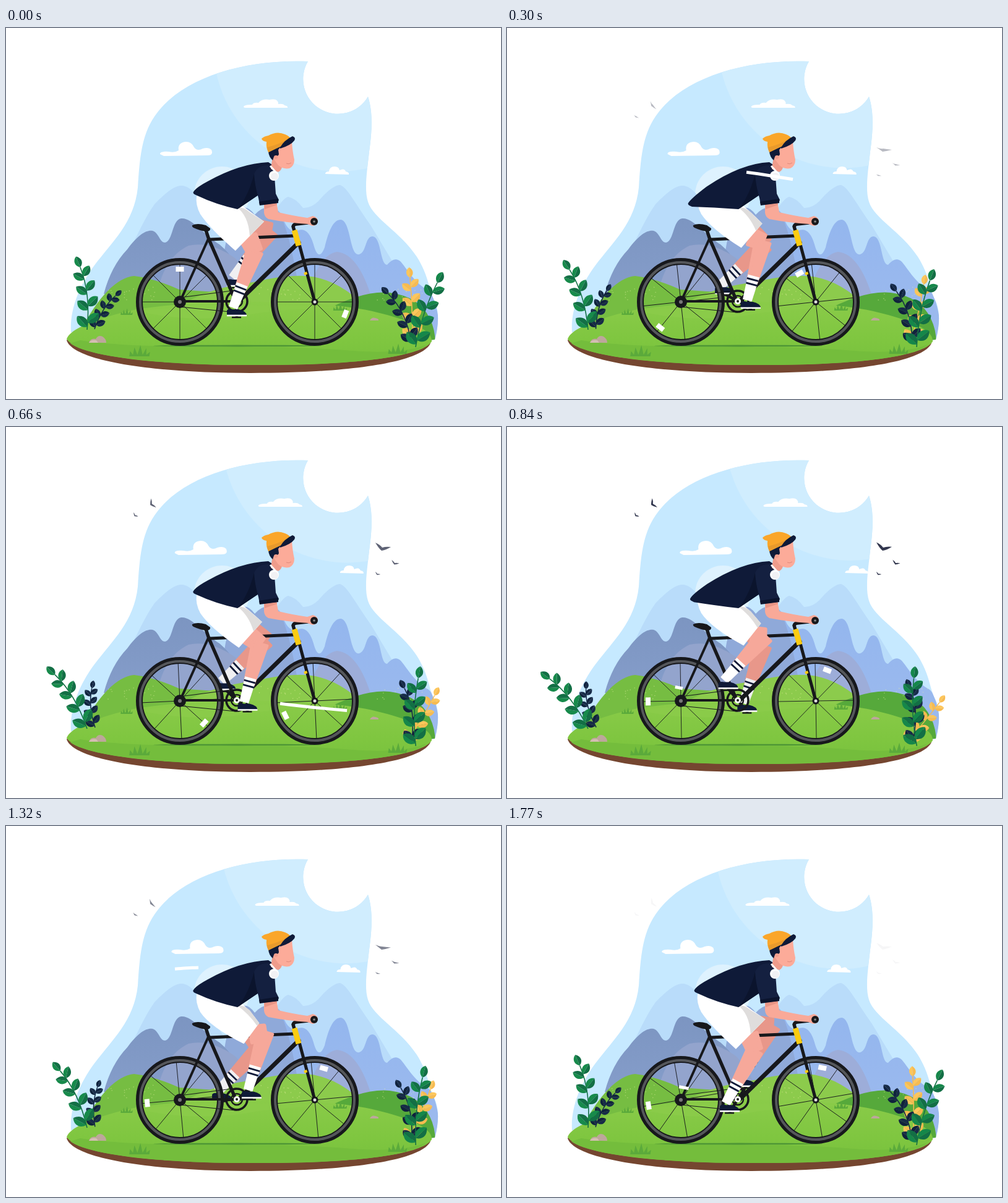
Recreate the animation shown at these times as an HTML page. Size 800 px wide and 600 px high, loop 1.8 s.

```html
<!DOCTYPE html>
<html lang="en">
<head>
<meta charset="utf-8">
<title>Cyclist</title>
<style>
html, body { margin: 0; width: 100%; height: 100%; overflow: hidden; background: #fff; }
svg { display: block; width: 800px; height: 600px; }
.line { fill: none; stroke: #17181c; }
</style>
</head>
<body>
<svg viewBox="0 0 800 600">
  <defs>
    <linearGradient id="rock" x1="0" y1="0" x2="0" y2="1">
      <stop offset="0" stop-color="#7c95c1"/><stop offset="1" stop-color="#859dca"/>
    </linearGradient>
    <linearGradient id="range" x1="0" y1="0" x2="0" y2="1">
      <stop offset="0" stop-color="#93b6ee"/><stop offset="1" stop-color="#9dbaee"/>
    </linearGradient>
    <linearGradient id="lawn" x1="0" y1="0" x2="0" y2="1">
      <stop offset="0" stop-color="#8acb49"/><stop offset=".6" stop-color="#7fc640"/><stop offset="1" stop-color="#78c13d"/>
    </linearGradient>
    <clipPath id="blob">
      <path d="M105 492C103 455 118 418 142 385C172 345 207 315 213 258C216 215 218 175 240 143C282 80 385 50 488 54A54 54 0 0 0 585 111C593 135 592 165 587 200C583 235 579 262 585 281C594 309 636 328 664 370C684 402 682 420 692 440C700 455 700 480 693 504L400 530Z"/>
    </clipPath>
  </defs>

  <g clip-path="url(#blob)">
    <rect x="90" y="40" width="620" height="500" fill="#c6e9ff"/>
    <circle id="glow" cx="538" cy="29" r="203" fill="#d0edfe"/>
    <circle cx="349" cy="269" r="45" fill="#def2fe"/>
    <g fill="#b9dcfa">
      <path d="M160 425C200 370 215 320 240 285Q270 253 285 255Q300 256 318 285L400 420Z"/>
      <path d="M385 420C410 350 435 280 456 273Q468 275 480 291Q492 292 505 280C520 262 532 254 540 254C552 258 565 285 590 320L650 420Z"/>
    </g>
    <path d="M380 430Q395 330 422 298Q436 286 446 303Q455 332 470 328Q488 320 497 350Q505 380 515 355C522 325 530 310 541 310C558 312 555 370 571 366C583 362 580 338 592 337C607 337 604 383 616 383C622 376 630 370 638 378C650 392 660 412 682 424Q696 432 705 510H380Z" fill="url(#range)"/>
    <path d="M345 440Q352 325 372 300Q386 280 402 302Q426 276 446 308Q462 345 476 440Z" fill="#8fa9d9"/>
    <path d="M484 440Q505 366 535 362Q570 365 592 440Z" fill="#9dadd9"/>
    <path d="M158 430Q170 385 196 358C214 333 228 326 237 328C248 332 248 347 257 347C270 345 268 310 283 308C300 306 318 333 345 350Q375 375 395 430Z" fill="url(#rock)"/>
    <path d="M244 430Q256 370 295 352Q330 344 370 372Q392 395 405 430Z" fill="#93a4cd"/>
    <path d="M120 490Q165 405 207 401Q240 405 280 423L380 430V490Z" fill="#76bd42"/>
    <path d="M250 480Q290 425 400 411Q450 399 485 401Q540 405 590 460V480Z" fill="#8ccb4c"/>
    <path d="M510 460Q575 424 620 428Q668 434 685 470Q694 488 694 512H510Z" fill="#56a93b"/>
    <g id="clouds" fill="#fff">
      <path d="M384 128Q384 124 398 124Q400 120 408 121Q414 114 426 116Q440 113 440 123Q448 122 450 125Q456 126 455 129L386 129Z"/>
      <path d="M249 204Q248 199 263 200Q273 202 279 198Q277 185 291 184Q300 184 304 193Q309 200 318 195Q327 192 332 197Q336 206 325 206L255 207Z"/>
      <path d="M516 236Q516 232 522 232Q523 224 531 224Q538 224 539 230Q547 226 549 232Q555 233 554 237Z"/>
    </g>
  </g>

  <path d="M98 505C108 538 235 558 395 558C560 558 672 540 686 510L670 490H110Z" fill="#754630"/>
  <path d="M98 503C103 489 130 476 185 461C270 438 510 436 600 460C650 472 690 488 688 507C670 535 540 546 392 545C240 545 116 531 98 503Z" fill="url(#lawn)"/>
  <path d="M120 505C230 523 420 509 560 522Q640 528 680 512C650 538 520 546 392 545C250 545 130 531 104 510Z" fill="#74bd3c"/>
  <path d="M213 458Q360 440 560 454Q470 450 390 464Q300 478 213 458Z" fill="#8acb49"/>
  <g fill="#eef3a4" opacity=".45" id="flowers"></g>
  <g fill="#5baa3b" id="tufts"></g>
  <path d="M134 509Q137 501 145 503Q149 496 156 499Q162 503 162 509Z" fill="#bda79b"/>
  <path d="M134 509Q138 503 146 505L149 509Z" fill="#d4beb2"/>
  <path d="M588 473Q591 467 597 469Q603 470 602 473Z" fill="#bda79b"/>
  <ellipse cx="374" cy="514" rx="136" ry="1.400" fill="#4e9636"/>

  <g id="birds" fill="#20263f"></g>
  <g id="farLeg"></g>

  <g id="wheels"></g>
  <g class="line" stroke-linecap="round">
    <path d="M281 443L327 341M281 442H372" stroke-width="4"/>
    <path d="M322 324L328 342L371 441" stroke-width="5.500"/>
    <path d="M329 342L467 336" stroke-width="5"/>
    <path d="M473 347L376 442" stroke-width="7"/>
    <path d="M474 350L499 443" stroke-width="5"/>
    <path d="M466 328L464 321Q465 317 470 317L496 314" stroke-width="5.500"/>
    <path d="M281 436L372 424M281 451L372 460" stroke-width="1.200"/>
  </g>
  <path d="M301 319Q309 315 323 319L330 324Q331 329 323 329Q314 328 303 323Q300 321 301 319Z" fill="#17181c"/>
  <path d="M466 327L473 352" stroke="#fbcc12" stroke-width="9"/>
  <path d="M483.500 395L485 399" stroke="#fbcc12" stroke-width="5"/>
  <circle cx="281" cy="443" r="10" fill="#17181c"/><circle cx="281" cy="443" r="3" fill="#777"/>
  <circle cx="499" cy="443" r="5.500" fill="#17181c"/><circle cx="499" cy="443" r="2.500" fill="#ddd"/>
  <g id="reflectors" fill="#fff">
    <rect x="-6.500" y="-57" width="13" height="8"/><rect x="-6.500" y="-57" width="13" height="8"/>
  </g>
  <circle cx="373" cy="442" r="17" class="line" stroke-width="3.500"/>
  <circle cx="373" cy="442" r="9" class="line" stroke-width="2.500"/>

  <g id="nearLeg"></g>
  <g id="body"></g>

  <path d="M417 283L437 281L440 298Q465 304 487 307L496 304Q504 306 504 313Q502 320 495 320L487 317Q455 315 424 309Q418 306 417 299Z" fill="#f9a998"/>
  <path d="M417 283L437 281L438 286L418 293Z" fill="#e89585"/>
  <circle cx="498" cy="313" r="6" fill="#17181c"/><circle cx="498" cy="313" r="1.800" fill="#888"/>
  <path d="M401 236Q407 221 424 222Q433 226 434 240L436 268L441 278L439 283L410 286L408 275Q402 255 401 236Z" fill="#142040"/>
  <path d="M409 281L440 276L440 283L410 287Z" fill="#0b142d"/>

  <path d="M431 207L446 222Q447 229 440 233L428 228Z" fill="#ef9c8b"/>
  <path d="M436 198L462 184Q463 200 466 213Q466 223 458 227Q448 229 440 222L432 211Z" fill="#fcab99"/>
  <path d="M424 200L446 190L440 197L441 204Q440 208 437 206L433 208L431 214Q425 209 424 200Z" fill="#0f1a38"/>
  <circle cx="436" cy="209" r="3" fill="#f39f8e"/>
  <path d="M453 219Q457 221 461 218" fill="none" stroke="#e08a7c"/>
  <path d="M413 179Q417 175 424 174Q438 166 451 172Q459 175 462 182L424 201Q420 194 421 184Q414 183 413 179Z" fill="#faa62a"/>
  <path d="M422 193Q442 188 460 178L462 183L424 201Z" fill="#e89a2c"/>
  <path d="M443 193Q450 181 463 175Q469 177 466 182Q460 190 443 195Z" fill="#0f1a38"/>
  <path d="M427 223L435 232" stroke="#fff" stroke-width="3"/>
  <circle cx="433" cy="239" r="8" fill="#fff"/><circle cx="434" cy="240" r="6" fill="#f1f1f4"/>

  <g id="plants"></g>
  <g id="streaks" fill="none" stroke="#fff" stroke-width="5"></g>
</svg>

<script>
const FRAME = 36, COUNT = 50, RAD = Math.PI / 180;
const NAVY = '#0f1a38';
const $ = id => document.getElementById(id);
const clamp = (v, lo, hi) => Math.min(hi, Math.max(lo, v));
const mix = (p, q, u) => [p[0] + (q[0] - p[0]) * u, p[1] + (q[1] - p[1]) * u];
const poly = (pts, fill, extra = '') =>
  `<polygon points="${pts.map(p => p.map(v => v.toFixed(1))).join(' ')}" fill="${fill}" ${extra}/>`;

// Value at k from [k, value] pairs; eased joins turn points smoothly.
function track(k, keys, eased) {
  let i = 1;
  while (i < keys.length - 1 && keys[i][0] < k) i++;
  const [a, b] = [keys[i - 1], keys[i]];
  let u = clamp((k - a[0]) / (b[0] - a[0]), 0, 1);
  if (eased) u = (1 - Math.cos(Math.PI * u)) / 2;
  return a[1] + (b[1] - a[1]) * u;
}

// --- still parts ---
function wheel(cx) {
  const ring = (r, w, c) => `<circle r="${r}" fill="none" stroke="${c}" stroke-width="${w}"/>`;
  const spokes = Array.from({ length: 8 }, (_, i) => i * 45 * RAD).map(a =>
    `M0 0L${61 * Math.cos(a)} ${61 * Math.sin(a)}`).join('');
  return `<g transform="translate(${cx} 443)"><path class="line" stroke-width=".9" d="${spokes}"/>` +
    ring(65.5, 11, '#17181c') + ring(64, 4, '#55575b') + '</g>';
}
$('wheels').innerHTML = wheel(281) + wheel(499);
const spokes = $('wheels').querySelectorAll('path');

$('tufts').innerHTML = [[216, 531, 1.2], [633, 527, 1.1], [195, 464, .7], [540, 457, .8]].map(([x, y, s]) =>
  `<path transform="translate(${x} ${y}) scale(${s})" d="M-14 0L-13-7L-9-2L-7-12L-3-2L1-15L4-2L9-11L9-2L14-6L13 0Z"/>`).join('');

let seed = 7;
const rand = () => (seed = seed * 16807 % 2147483647) / 2147483647;
$('flowers').innerHTML = Array.from({ length: 60 }, (_, i) => {
  const x = [165, 400, 600][i % 3] + rand() * 80, y = 418 + rand() * 24;
  return `<circle cx="${x}" cy="${y}" r=".8"/>`;
}).join('');

// --- plants: a bent stem with paired leaves, turned about a pivot ---
function leaf(x, y, angle, len, fill, shade) {
  const w = len * .42;
  return `<g transform="translate(${x} ${y}) rotate(${angle})">` +
    `<path fill="${fill}" d="M0 0C${len * .25} ${-w} ${len * .75} ${-w} ${len} 0Z"/>` +
    `<path fill="${shade}" d="M0 0C${len * .25} ${w} ${len * .7} ${w} ${len} 0Z"/></g>`;
}
function plant(base, ctrl, tip, pairs, len, fill, shade) {
  const at = u => mix(mix(base, ctrl, u), mix(ctrl, tip, u), u);
  let out = `<path d="M${base}Q${ctrl} ${tip}" fill="none" stroke="${shade}" stroke-width="1.6"/>`;
  for (let i = 0; i < pairs * 2; i++) {
    const side = i % 2, u = .04 + .74 * (i >> 1) / (pairs - 1) + side * .06;
    const [x, y] = at(u), [nx, ny] = at(u + .03);
    const dir = Math.atan2(ny - y, nx - x) / RAD;
    out += leaf(x, y, dir + (side ? 48 : -48), len * (1.1 - .25 * u), fill, shade);
  }
  const end = Math.atan2(tip[1] - ctrl[1], tip[0] - ctrl[0]) / RAD;
  return out + leaf(tip[0], tip[1], end, len * .85, fill, shade);
}
const plants = [
  { pivot: [142, 485], turn: -2.05, art: plant([143, 487], [155, 452], [177, 433], 4, 15, '#10223d', '#172b48') },
  { pivot: [131, 488], turn: -1.36, art: plant([131, 488], [137, 430], [120, 387], 4, 22, '#178a4b', '#136f45') },
  { pivot: [640, 495], turn: 1.82, shrink: .007, art: plant([657, 505], [657, 450], [653, 404], 4, 20, '#fdc65b', '#f7bb50') },
  { pivot: [655, 510], turn: .98, art: plant([655, 510], [648, 460], [618, 430], 4, 18, '#10223d', '#172b48') },
  { pivot: [662, 515], turn: -.92, art: plant([662, 516], [672, 460], [697, 412], 4, 23, '#15874a', '#136f45') }
];
$('plants').innerHTML = plants.map(p => `<g>${p.art}</g>`).join('');

// --- birds ---
const flock = [[608, 199, 1, 0], [628, 222, .52, 8], [600, 239, .36, 10], [234, 126, .65, 45], [208, 144, .38, 25]];
function birds(k, p) {
  const lift = track(k, [[0, -11], [8, -6], [18, -12], [28, -13], [36, -7], [41, -5], [49, -10]]);
  const right = lift / 2 + 1;
  $('birds').setAttribute('opacity', p / 25);
  $('birds').innerHTML = flock.map(([x, y, s, a]) =>
    `<path transform="translate(${x} ${y}) rotate(${a}) scale(${s})" d="M-11 ${lift}Q-4 ${lift + 3} 0 -4Q6 ${right - 1} 14 ${right}Q6 0 -1 1Q-6 -3 -11 ${lift}Z"/>`).join('');
}

// --- legs ---
const HUB = [373, 442], THIGH = 88, CALF = 95;
function pose(hip, angle) {
  const pedal = [HUB[0] + 24 * Math.cos(angle * RAD), HUB[1] + 24 * Math.sin(angle * RAD)];
  const ankle = [pedal[0] - 5, pedal[1] - 16];
  const dx = ankle[0] - hip[0], dy = ankle[1] - hip[1], d = Math.hypot(dx, dy);
  const bend = Math.acos((THIGH ** 2 + d * d - CALF ** 2) / (2 * THIGH * d));
  const tilt = Math.atan2(dy, dx) - bend;
  const knee = [hip[0] + THIGH * Math.cos(tilt), hip[1] + THIGH * Math.sin(tilt)];
  return { pedal, ankle, knee, tilt: tilt / RAD };
}
function taper(p, q, a, b, fill, round = 0) {
  const d = Math.hypot(q[0] - p[0], q[1] - p[1]);
  const nx = (p[1] - q[1]) / d, ny = (q[0] - p[0]) / d;
  const off = (c, w) => [c[0] + nx * w, c[1] + ny * w];
  return poly([off(p, a), off(p, -a), off(q, -b), off(q, b)], fill,
    round ? `stroke="${fill}" stroke-width="${round}" stroke-linejoin="round"` : '');
}
function leg({ pedal, ankle, knee }, root, skin, sock) {
  const up = u => mix(ankle, knee, u);
  const [x, y] = pedal;
  return taper(root, knee, 13, 11, skin, 6) + taper(knee, up(.3), 12, 7, skin, 5) +
    taper(up(.4), up(-.03), 9.5, 7.5, sock) +
    taper(up(.35), up(.32), 9.6, 9.4, NAVY) + taper(up(.27), up(.24), 9.2, 9, NAVY) +
    `<path d="M${x - 16} ${y - 1}V${y - 9}Q${x - 14} ${y - 13} ${x - 6} ${y - 11}L${x + 3} ${y - 11}Q${x + 16} ${y - 8} ${x + 16} ${y - 1}Z" fill="${NAVY}"/>` +
    `<path d="M${x - 16} ${y - 1}H${x + 16}" stroke="#fff" stroke-width="2.6"/>` +
    `<path d="M${x - 8} ${y + 2}h15" stroke="#17181c" stroke-width="2.4"/>`;
}
const crank = ([x, y]) =>
  `<path d="M${HUB}L${x} ${y}" stroke="#17181c" stroke-width="4.5" stroke-linecap="round"/>`;

function rider(k) {
  const angle = 90 + 37.4 * k;
  const near = pose([337, 302], angle), far = pose([343, 302], angle + 180);
  const u = clamp((near.tilt - 20) / 22, -.5, 1.1);
  const low = mix([385, 352], [371, 360], u), high = mix([409, 319], [417, 313], u);

  $('farLeg').innerHTML = crank(far.pedal) + leg(far, [385, 320], '#e8978a', '#f0f0f2');
  $('nearLeg').innerHTML = crank(near.pedal) +
    `<circle cx="373" cy="442" r="5" fill="#fff"/><circle cx="373" cy="442" r="2" fill="#17181c"/>` +
    leg(near, mix(low, high, .45), '#f6a89a', '#fff');

  const dip = track(k, [[0, 0], [8, 1], [17, 0], [26, .9], [35, 0], [42, .5], [49, 0]], true);
  const tail = [303 - 10 * dip, 265 + 18 * dip];
  const [tx, ty] = tail, fold = mix(high, low, clamp(.12 + .4 * u, .08, .5));
  $('body').innerHTML =
    `<path d="M308 272Q306 286 314 301Q330 325 ${low}L${high}Q394 297 375 282Z" fill="#fff"/>` +
    `<path d="M372 289Q386 290 394 298L${high}L${fold}Q392 303 372 289Z" fill="#dfdddc"/>` +
    `<path d="M${tail}Q${tx + 4} ${ty - 7} ${326 - 4 * dip} ${248 + 9 * dip}Q378 219 424 217Q434 222 434 234L420 262Q402 274 374 293Q${338 - 4 * dip} ${285 + 5 * dip} ${tx + 6} ${ty + 6}Q${tx - 2} ${ty + 3} ${tail}Z" fill="${NAVY}"/>` +
    `<path d="M401 236Q404 258 408 270L374 293Q392 272 401 236Z" fill="#0b142d"/>`;
}

// --- wind streaks ---
const upper = x => 242 - 13 * Math.cos(Math.PI * (x - 320) / 250);
const lower = x => 458.5 + .083 * (x - 551) - .00019 * (x - 551) ** 2;
const gusts = [
  { y: upper, k: 8, x: 387, end: 235, grow: 1, max: 75 },
  { y: upper, k: 28, x: 547, end: 235, grow: 1, max: 75 },
  { y: lower, k: 18, x: 443, end: 250, grow: .56, max: 145 },
  { y: lower, k: 41, x: 552, end: 250, grow: .56, max: 145 }
];
function streaks(k) {
  $('streaks').innerHTML = gusts.map(g => {
    const head = g.x - 34.25 * (k - g.k), len = clamp((head - g.end) * g.grow, 0, g.max);
    if (len < 1 || head > 720) return '';
    const pts = Array.from({ length: 9 }, (_, i) => head + len * i / 8).map(x => [x, g.y(x)]);
    return `<polyline points="${pts.join(' ')}"/>`;
  }).join('');
}

function draw(k) {
  const p = Math.min(k, COUNT - k), spin = 27.35 * k;
  $('clouds').setAttribute('transform', `translate(${1.32 * p} 0)`);
  $('glow').setAttribute('transform', `translate(${.77 * p} ${-.7 * p})`);
  spokes.forEach(s => s.setAttribute('transform', `rotate(${spin})`));
  [...$('reflectors').children].forEach((r, i) =>
    r.setAttribute('transform', `translate(${i ? 499 : 281} 443) rotate(${spin + i * 111.5})`));
  plants.forEach(({ pivot: [x, y], turn, shrink = 0 }, i) =>
    $('plants').children[i].setAttribute('transform',
      `translate(${x} ${y}) rotate(${turn * p}) scale(${1 - shrink * p}) translate(${-x} ${-y})`));
  birds(k, p);
  rider(k);
  streaks(k);
}

let shown = -1;
function tick() {
  const k = Math.floor((performance.now() + .5) / FRAME) % COUNT;
  if (k !== shown) draw(shown = k);
  requestAnimationFrame(tick);
}
tick();
</script>
</body>
</html>
```
